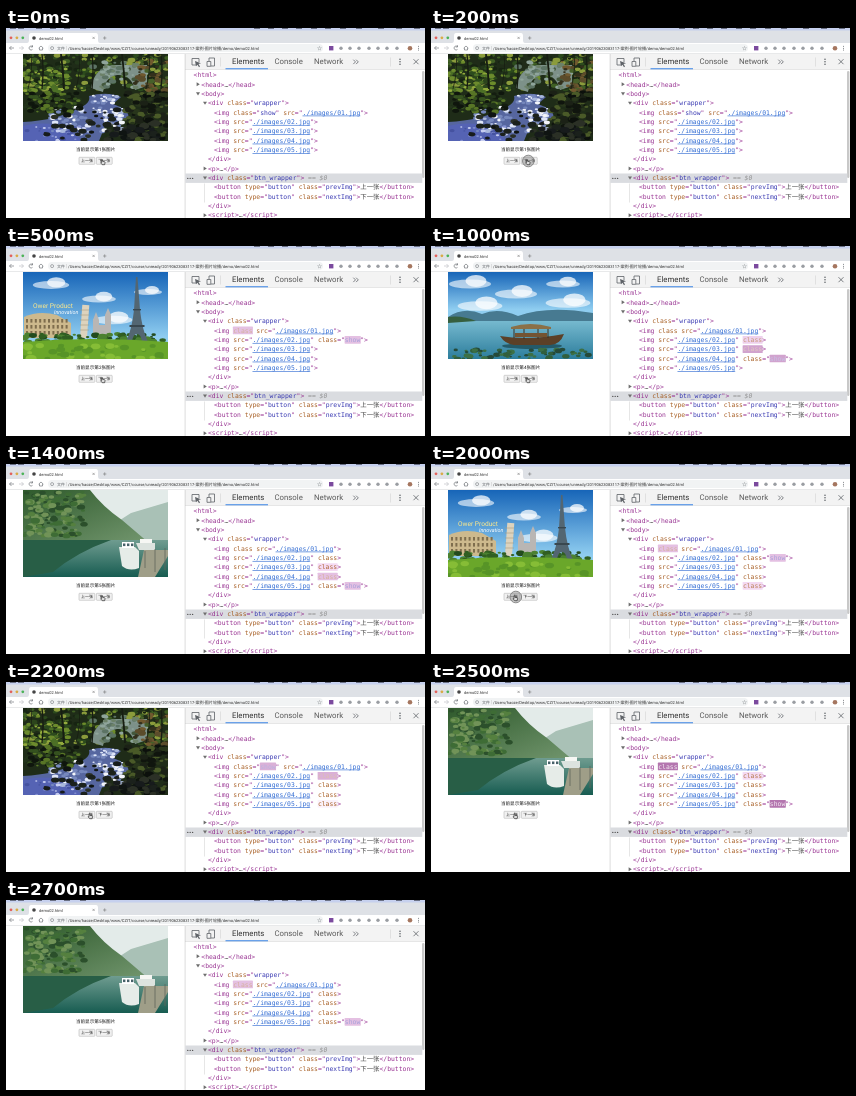
Animation, 419 px wide and 190 px high, one loop 2.8 s. Source, as an HTML page:

```html
<!DOCTYPE html>
<html lang="zh">
<head>
<meta charset="utf-8">
<title>Image switcher</title>
<style>
html, body { margin: 0; width: 100%; height: 100%; overflow: hidden; background: #fff; }
svg { display: block; width: 419px; height: 190px; text-rendering: geometricPrecision; }
text { white-space: pre; font-family: Roboto, "Noto Sans CJK SC", "Noto Sans CJK", sans-serif; }
.code text { font: 6.4px "DejaVu Sans Mono", "Noto Sans CJK SC", "Noto Sans CJK", monospace; opacity: .86; }
</style>
</head>
<body>
<svg viewBox="0 0 419 190" xmlns="http://www.w3.org/2000/svg">
  <defs>
    <linearGradient id="sky" x2="0" y2="1"><stop stop-color="#1765b8"/><stop offset=".75" stop-color="#8fcdf0"/></linearGradient>
    <linearGradient id="lake" x2="0" y2="1"><stop stop-color="#76b9cf"/><stop offset="1" stop-color="#2c7d9c"/></linearGradient>
    <linearGradient id="jade" x2="0" y2="1"><stop stop-color="#6f9c90"/><stop offset="1" stop-color="#175c51"/></linearGradient>
    <linearGradient id="hill" x2="1" y2="1"><stop stop-color="#2f5a2c"/><stop offset="1" stop-color="#73976f"/></linearGradient>
    <clipPath id="frame"><path d="M0 0H145V87H0Z"/></clipPath>
    <filter id="soft"><feGaussianBlur stdDeviation=".7"/></filter>
  </defs>
  <path d="M0 0H419V190H0Z" fill="#fff"/>
  <g id="chrome"></g>
  <g id="photos" transform="translate(17 26)" clip-path="url(#frame)"></g>
  <text id="caption" x="89.6" y="122.8" font-size="4.6" text-anchor="middle" fill="#111"></text>
  <g id="buttons"></g>
  <g id="pointer">
    <circle id="ring" cx="2.8" cy="2" r="5.8" fill="#7776" stroke="#777" stroke-width=".8"/>
    <path transform="scale(.75)" d="M1.4 4.6V.8Q2 0 2.6.8V3L5.6 3.7Q6.3 4 6.1 5L5.5 7.6H2.3L.2 5.2Q.3 4.2 1.4 4.6Z" fill="#ddd" stroke="#111" stroke-width=".8"/>
  </g>
  <g id="tools"></g>
  <g id="tree" class="code"></g>
  <g id="images" class="code"></g>
</svg>
<script>
const $ = id => document.getElementById(id);
const esc = s => s.replace(/&/g, '&amp;').replace(/</g, '&lt;');
const rect = (x, y, w, h, fill, extra = '') => `<rect x="${x}" y="${y}" width="${w}" height="${h}" fill="${fill}" ${extra}/>`;
const dot = (x, y, r, fill) => `<circle cx="${x}" cy="${y}" r="${r}" fill="${fill}"/>`;
const oval = (x, y, rx, ry, fill) => `<ellipse cx="${x}" cy="${y}" rx="${rx}" ry="${ry}" fill="${fill}"/>`;
const shape = (d, fill) => `<path d="${d}" fill="${fill}"/>`;
const line = (d, stroke = '#5f6368', w = .8) => `<path d="${d}" fill="none" stroke="${stroke}" stroke-width="${w}"/>`;
const label = (x, y, size, s, fill = '#333', extra = '') =>
  `<text x="${x}" y="${y}" font-size="${size}" fill="${fill}" ${extra}>${esc(s)}</text>`;
const soft = s => `<g filter="url(#soft)">${s}</g>`;

function random(seed) {
  return () => (seed = (seed * 16807) % 2147483647) / 2147483647;
}
function scatter(seed, n, [x, y, w, h], r, colors) {
  const rnd = random(seed * 7919);
  let out = '';
  for (let i = 0; i < n; i++) {
    const size = r * (.5 + rnd());
    out += oval(x + rnd() * w, y + rnd() * h, size * 1.3, size * .8, colors[Math.floor(rnd() * colors.length)]);
  }
  return out;
}

// Browser window
const urlPath = '/Users/haoze/Desktop/www/CZIT/course/unready/20190623083117-案例-图片轮播/demo/demo02.html';
const menuMarks = [4, 12, 30, 44, 58, 74, 248, 262, 276, 290, 305, 319, 334, 350, 372, 390, 408];
$('chrome').innerHTML =
  rect(0, 0, 419, 4, '#c6d0ee') + menuMarks.map(x => rect(x, 0, 6, 1, '#6a7084')).join('') +
  rect(0, 2.5, 419, 12.5, '#dee1e6') + shape('M21 15Q23 15 23 12V8Q23 5 25 5H90Q92 5 92 8V12Q92 15 94 15Z', '#fff') +
  ['#e2605a', '#d9ab45', '#4bb357'].map((c, i) => dot(5 + i * 5.9, 9.8, 1.4, c)).join('') +
  dot(28, 10, 1.8, '#444') + label(33, 11.5, 4, 'demo02.html') +
  line('M86.5 8.8l2.2 2.2m0-2.2l-2.2 2.2M97 10h3.4m-1.7-1.7v3.4', '#666', .5) +
  rect(0, 15, 419, 10.5, '#fff') + rect(42, 16, 275, 8, '#f1f3f4', 'rx="4"') +
  line('M8 20H3.5m2-2l-2 2l2 2', '#5f6368', .6) + line('M13 20h4.5m-2-2l2 2l-2 2', '#b5b8bc', .6) +
  line('M26.5 18.6A2 2 0 1 0 26.5 21.4M26.5 17.2v1.8h-1.8', '#5f6368', .6) +
  line('M32.6 20.2l2.4-2.2l2.4 2.2M33.5 19.8V22h3V19.8', '#5f6368', .6) +
  line('M44.6 20.1a1.5 1.5 0 1 0 3 0a1.5 1.5 0 1 0-3 0', '#5f6368', .5) +
  label(51, 21.6, 4, '文件', '#5f6368') + rect(60.3, 18, .3, 4.2, '#aaa') +
  label(62, 21.6, 4.08, urlPath) + label(311, 21.8, 5, '☆', '#5f6368') +
  rect(323, 18, 4.4, 4.4, '#7b4a9e') +
  [335, 344, 353, 363, 372, 381, 391].map(x => dot(x, 20.2, 1.7, '#9a9da2')).join('') +
  dot(404, 20.2, 2.3, '#a5765f') + [18.3, 20.2, 22.1].map(y => dot(412.5, y, .5, '#5f6368')).join('') +
  rect(0, 25.3, 419, .5, '#d0d2d5');

$('buttons').innerHTML = [['上一张', 73], ['下一张', 90.4]].map(([s, x]) =>
  rect(x, 129.3, 15.8, 7, '#f1f1f1', 'stroke="#aaa" stroke-width=".5" rx=".6"') +
  label(x + 7.9, 134.3, 4, s, '#111', 'text-anchor="middle"')).join('');

$('tools').innerHTML =
  rect(179, 26, 240, 164, '#fff') + rect(179, 26, 240, 15, '#f3f3f3') +
  rect(179, 41, 240, .5, '#ccc') + rect(178.8, 26, .5, 164, '#bbb') +
  line('M190 37H186V30.5H193V34') + shape('M189 33L195 35.2L192.5 36L194 38.6L193 39.2L191.5 36.8L190 38.3Z', '#5f6368') +
  line('M203 33V30H208.5V38H205M201 33.5h3.8v4.8h-3.8z') + rect(214, 29.5, .5, 9, '#ccc') +
  rect(219.5, 40.2, 42.5, 1.1, '#4a8ee8') +
  [['Elements', 226, '#333'], ['Console', 268.5], ['Network', 308]]
    .map(([s, x, c = '#5a5a5a']) => label(x, 36.3, 7.8, s, c)).join('') +
  line('M347.3 31.7l2.2 2.2l-2.2 2.2m2.8-4.4l2.2 2.2l-2.2 2.2') +
  rect(384.5, 29.5, .5, 9, '#ccc') + [31.2, 33.7, 36.2].map(y => dot(394, y, .8, '#5f6368')).join('') +
  line('M407.5 31.2l5 5m0-5l-5 5') + rect(416, 43, 2.4, 107, '#c8c8c8', 'rx="1.2"');

// Photos, simplified
const cloud = (x, y, s) => oval(x, y, 14 * s, 3 * s, '#fff9') + oval(x + 4 * s, y - 2 * s, 7 * s, 4 * s, '#fffb');
const mosses = ['#6d8c2b', '#3f5f24', '#22361a', '#172412', '#8b9c3c', '#2c4a1d'];
const rocks = ['#0f1412', '#1b211c', '#2b3026', '#171b1c'];
const foam = ['#dfe6f8', '#a9b8dc', '#f3f5fb', '#7688bd'];
const trunks = [8, 19, 38, 56, 69, 99, 126, 138].map((x, i) =>
  line(`M${x} 0Q${x + 2} 16 ${x + (i % 3) * 3 - 3} 35`, '#171d12', .8 + i % 3 * .5)).join('');
const stream = rect(0, 0, 145, 87, '#1f2c18') + soft(
  scatter(7, 260, [0, 0, 145, 36], 2, mosses) +
  scatter(31, 70, [0, 12, 45, 28], 2, ['#93ab3d', '#6c8b2d', '#4c6f26', '#2c451c']) +
  shape('M68 34Q71 14 90 11H124V32L112 36Q108 20 94 21Q82 23 80 38Z', '#7d9189') +
  scatter(12, 50, [70, 8, 54, 26], 2, ['#8fa59b', '#5c7364', '#44583c', '#6c8168']) +
  scatter(26, 60, [112, 6, 33, 36], 2, ['#5b4c2b', '#33301c', '#47602a', '#71592f']) +
  trunks +
  shape('M66 42Q84 37 98 43L90 50Q108 57 105 64L82 72L76 87H0V68Q34 66 48 57Q69 51 66 42Z', '#56669f') +
  shape('M0 72Q25 66 45 75L60 87H0Z', '#5563b4') +
  scatter(52, 90, [28, 53, 72, 25], 1.7, foam) +
  scatter(41, 24, [66, 41, 28, 9], 1.4, foam) +
  scatter(61, 30, [4, 72, 60, 15], 1.5, ['#c6cdf0', '#8491d2', '#4552a0']) +
  scatter(90, 100, [0, 38, 58, 20], 1.9, ['#141d10', '#35511f', '#587526', '#22341a', '#0f160d']) +
  scatter(14, 130, [102, 38, 43, 50], 2.4, ['#10150e', '#28351b', '#4a5a28', '#1b2116', '#0c100c']) +
  scatter(66, 34, [18, 54, 85, 32], 2.2, rocks) +
  scatter(73, 46, [82, 69, 55, 18], 2.8, rocks));

const tower = shape('M113 5L114.5 5L117 38Q119 57 125 70H119Q118 62 114 62Q110 62 109 70H103Q109 57 111 38Z', '#536672') +
  rect(110, 37, 8, 1.4, '#39474f') + rect(106.5, 53, 15, 2, '#39474f');
let arena = shape('M1 66V45Q16 38 34 43L48 51V66Z', '#cdb98d');
for (let row = 0; row < 3; row++)
  for (let i = 0; i < 10; i++) arena += rect(3 + i * 4.4, 47 + row * 6, 2, 3.6, '#7e6d4d');
const landmarks = rect(0, 0, 145, 87, 'url(#sky)') + soft(cloud(28, 13, 1.3) + cloud(76, 27, 1.2) + cloud(125, 20, 1) + cloud(90, 48, 1.4)) +
  arena + rect(57, 33, 7, 33, '#ddd3bd', 'transform="rotate(4 60 66)"') +
  [38, 43, 48, 53, 58].map(y => line(`M57 ${y}h9`, '#a99a7d', .6)).join('') +
  shape('M70 66V48L73 40L76 48V53H82V43L85 36L88 43V66Z', '#b9b6b4') +
  soft(scatter(19, 90, [0, 62, 145, 9], 2.4, ['#315f22', '#4b8130', '#234b1e'])) + tower +
  shape('M0 70Q70 64 145 70V87H0Z', '#6aa72a') + soft(scatter(44, 40, [0, 73, 145, 14], 3, ['#86bd36', '#579427'])) +
  label(10, 35.5, 6.6, 'Ower Product', '#ffe98a') + label(31, 41.5, 5.4, 'Innovation', '#fff', 'font-style="italic"');

const meadow = rect(0, 0, 145, 87, 'url(#sky)') + soft(cloud(40, 17, 1.4) + cloud(105, 28, 1.2)) +
  shape('M0 52L32 34L62 50L97 30L145 51V87H0Z', '#56838a') + shape('M0 58Q70 44 145 57V87H0Z', '#659c36') +
  soft(scatter(8, 35, [0, 62, 145, 24], 4, ['#8eb947', '#4f862e']));

const boatLake = rect(0, 0, 145, 50, 'url(#sky)') + soft(cloud(22, 12, 1.5) + cloud(68, 22, 1.5) + cloud(115, 12, 1.2) + cloud(120, 31, 1.6) + cloud(32, 34, 1.6)) +
  shape('M0 45Q16 34 34 42Q50 35 70 44Q100 33 145 41V52H0Z', '#477a91') + rect(0, 49, 145, 38, 'url(#lake)') +
  shape('M0 45Q14 43 28 49L0 51Z', '#365f3f') + soft(oval(84, 74, 30, 3, '#245a69')) +
  shape('M52 64Q80 69 116 62Q112 73 102 73H66Q57 72 52 64Z', '#5c4027') +
  shape('M63 55Q82 49 103 55V57H63Z', '#8b7047') + line('M66 57V66M76 57V67M90 57V67M100 57V66', '#3d3020', 1) +
  rect(67, 61, 32, 4, '#745432') + soft(scatter(23, 60, [0, 77, 145, 10], 2, ['#315f3d', '#3c7046', '#254a39']));

const harbour = rect(0, 0, 145, 60, '#e3ebe9') + shape('M66 50L108 23L145 12V60H50Z', '#a9c1b6') +
  shape('M0 0H67Q80 17 99 30L126 53H0Z', 'url(#hill)') +
  soft(scatter(37, 150, [0, 2, 62, 44], 2.4, ['#3e6c35', '#55803f', '#2b4f2b', '#719358'])) +
  rect(0, 50, 145, 37, 'url(#jade)') + soft(shape('M0 50H88Q54 62 30 82L0 87Z', '#285e46')) +
  shape('M96 57H112L116 61V78Q106 82 99 76Z', '#e6ece8') + rect(99, 52, 12, 6, '#fff') +
  [100, 104, 108].map(x => rect(x, 53.5, 2.4, 2.6, '#476169')).join('') +
  shape('M113 53H132V60H116Z', '#dce3df') + rect(117, 49, 12, 4, '#f6f7f4') +
  shape('M121 60H145V66L132 87H115Z', '#9f9e88') + line('M122 61V78M132 59V82M142 58V80', '#61665b', .8);

const photos = [stream, landmarks, meadow, boatLake, harbour];
$('photos').innerHTML = photos.map(p => `<g>${p}</g>`).join('');

// Element tree
const CH = 3.853, ROW = 9.35;
const TAG = '#881280', NAME = '#994500', VALUE = '#1a1aa6';
const rowY = i => 49.2 + i * ROW;
const span = (s, fill, extra = '') => `<tspan fill="${fill}" ${extra}>${esc(s)}</tspan>`;
const code = (x, row, spans) => `<text x="${x}" y="${rowY(row)}">${spans}</text>`;
const attr = (name, value) => span(' ' + name, NAME) + span('="', TAG) + span(value, VALUE) + span('"', TAG);
const arrow = (x, row, open) => {
  const y = rowY(row) - 2.2;
  return shape(open ? `M${x} ${y - 1.4}h4l-2 3.2z` : `M${x + .6} ${y - 2}v4l3.2-2z`, '#6e6e6e');
};
const folded = tag => span(`<${tag}>`, TAG) + span('…', '#333') + span(`</${tag}>`, TAG);
const openDiv = cls => span('<div', TAG) + attr('class', cls) + span('>', TAG);
const button = (cls, s) => span('<button', TAG) + attr('type', 'button') + attr('class', cls) +
  span('>', TAG) + span(s, '#222') + span('</button>', TAG);

$('tree').innerHTML = rect(179.3, 145.5, 237, 9.4, '#dadce0') + rect(198.5, 155.5, .5, 19, '#ccc') +
  [181.8, 184.2, 186.6].map(x => dot(x, 150.4, .7, '#555')).join('') +
  [[190, 1], [190, 2, 1], [197, 3, 1], [197, 10], [197, 11, 1], [197, 15]].map(a => arrow(...a)).join('') +
  [[187.6, 0, span('<html>', TAG)], [195.3, 1, folded('head')], [195.3, 2, span('<body>', TAG)],
   [202, 3, openDiv('wrapper')], [202, 9, span('</div>', TAG)], [202, 10, folded('p')],
   [202, 11, openDiv('btn_wrapper') + span(' == $0', '#888', 'font-style="italic"')],
   [208, 12, button('prevImg', '上一张')], [208, 13, button('nextImg', '下一张')],
   [202, 14, span('</div>', TAG)], [202, 15, folded('script')]].map(a => code(...a)).join('');

// Timeline: each press shows another picture
const LOOP = 2800, STEP = 100, FADE = 700;
const clicks = [[300, 1], [700, 2], [900, 3], [1200, 4], [1600, 0], [1800, 1], [2060, 0], [2500, 4]];

const mix = (a, b, k) => `rgb(${a.map((v, i) => Math.round(v + (b[i] - v) * k))})`;
const easeOut = k => 1 - (1 - k) ** 3;
const WHITE = [255, 255, 255], PLUM = [180, 118, 175], PINK = [245, 219, 244];

// Plum fades to pink while the word darkens, then pink fades out
function flash(age, ink) {
  const p = age / FADE;
  if (p >= 1) return null;
  const k = p / .8;
  return k < 1
    ? { back: mix(PLUM, PINK, easeOut(k)), ink: mix(WHITE, ink, k ** .8) }
    : { back: mix(PINK, WHITE, easeOut((p - .8) / .2)), ink: mix(ink, ink, 0) };
}

function stateAt(t) {
  const imgs = photos.map((_, i) => ({ cls: i ? null : 'show', since: -LOOP }));
  let shown = 0;
  for (const [at, next] of clicks) {
    if (t < at) break;
    imgs[shown] = { cls: '', since: at };
    imgs[next] = { cls: 'show', since: at };
    shown = next;
  }
  return { imgs, shown };
}

function imageRow({ cls, since }, i, t) {
  const src = span(' src', NAME) + span('="', TAG) +
    span(`./images/0${i + 1}.jpg`, '#1155cc', 'text-decoration="underline"') + span('"', TAG);
  const lit = flash(t - since, cls ? [26, 26, 166] : [153, 69, 0]);
  let cl = '', back = '';
  if (cls !== null) {
    cl = cls ? span(' class', NAME) + span('="', TAG) + span(cls, lit ? lit.ink : VALUE) + span('"', TAG)
             : span(' class', lit ? lit.ink : NAME);
    const col = (i ? 27 : 5) + (cls ? 7 : 0);
    if (lit) back = rect(208 + col * CH - .4, rowY(4 + i) - 6, (cls ? 4 : 5) * CH + .8, 7.7, lit.back, 'rx=".6"');
  }
  return back + code(208, 4 + i, span('<img', TAG) + (i ? src + cl : cl + src) + span('>', TAG));
}

function draw(t) {
  const { imgs, shown } = stateAt(t);
  [...$('photos').children].forEach((g, i) => g.setAttribute('display', i === shown ? 'inline' : 'none'));
  $('caption').textContent = `当前显示第${shown + 1}张图片`;
  $('images').innerHTML = imgs.map((img, i) => imageRow(img, i, t)).join('');
  const x = t < 1900 ? 94.5 : 82;
  $('pointer').setAttribute('transform', `translate(${x} 131)`);
  $('pointer').setAttribute('display', t < 2600 ? 'inline' : 'none');
  // The ring sits on the pointer while the button is down
  const pressed = clicks.some(([at]) => t >= at - STEP && t < at);
  $('ring').setAttribute('display', pressed ? 'inline' : 'none');
}

const start = performance.now();
let last = -1;
function tick() {
  const t = Math.floor(((performance.now() - start) % LOOP) / STEP) * STEP;
  if (t !== last) draw(last = t);
  requestAnimationFrame(tick);
}
tick();
</script>
</body>
</html>
```
